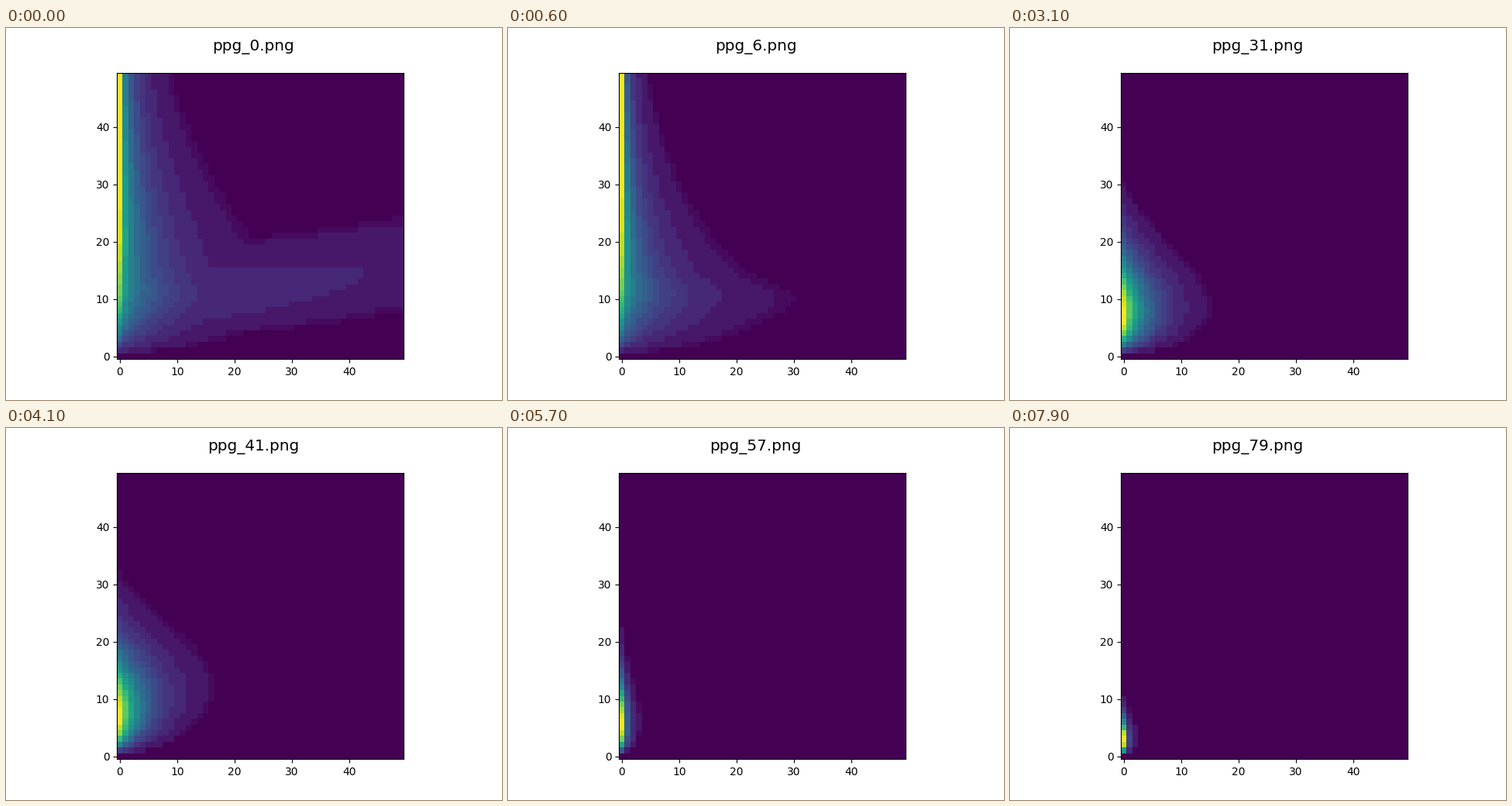
Recreate the animation shown at these times as a matplotlib script. Size 640 by 480 pixels, loop 8 s.

```python
import numpy as np
import matplotlib.pyplot as plt
from matplotlib.animation import FuncAnimation

plt.rcParams["text.kerning_factor"] = 6

N, FRAMES, STEP_MS = 50, 80, 100
Y, X = np.mgrid[0:N, 0:N].astype(float)


def bell(d, width):
    return np.exp(-(d / width) ** 2)


def decay(reach, power):
    return np.exp(-(X / reach) ** power)


def tall(rise, fall):
    """Column that saturates upward and reaches furthest near row 10."""
    reach = 5 / (1 + (Y / fall) ** 2) + bell(Y - 10, 3.5)
    return (1 - np.exp(-Y / rise)) * decay(reach, 0.6)


def plume():
    """Faint ridge that bends up towards the right edge."""
    d = Y - (8.5 + 0.06 * X + 0.0018 * X ** 2)
    width = np.where(d > 0, 8.9 + 0.02 * X, 5.5 + 0.0016 * X ** 2)
    return (0.14 - 0.0013 * X) * np.clip(X / 10, 0, 1) * bell(d, width)


def blob(peak, sharp, reach, mid):
    """Gamma-shaped column that reaches furthest at row mid."""
    r = np.maximum(Y, 1e-3) / peak
    column = np.exp(np.where(r > 1, sharp, 1.4) * (np.log(r) + 1 - r))
    return (Y > 0) * column * decay(reach * bell(Y - mid, 22), 0.9)


STATES = {
    0: np.maximum(tall(7.5, 28), plume()),
    6: tall(8, 19),
    15: blob(7, 1.3, 4.5, 10),
    31: blob(7.5, 1.93, 4.2, 12),
    41: blob(7.3, 1.73, 5.5, 20),
    57: blob(5.7, 2.04, 0.88, 8),
    79: blob(3, 2.47, 0.66, 4),
}
TIMES = list(STATES)
LOGS = [np.log(v + 1e-4) for v in STATES.values()]


def banded(v):
    """Coarse colour steps, finest near the dark end."""
    steps = np.minimum(0.15 + 0.04 * np.floor((v - 0.13) / 0.04), 1)
    return np.select([v < 0.037, v < 0.045, v < 0.085, v < 0.13],
                     [0, 0.03, 0.065, 0.11], steps)


def field(n):
    """Blend neighbouring states geometrically, then scale to a peak of 1."""
    k = min(np.searchsorted(TIMES, n, side="right") - 1, len(TIMES) - 2)
    f = (n - TIMES[k]) / (TIMES[k + 1] - TIMES[k])
    v = np.exp((1 - f) * LOGS[k] + f * LOGS[k + 1])
    return banded(v / v.max())


fig, ax = plt.subplots(figsize=(6.4, 4.8), dpi=100)
image = ax.imshow(field(0), origin="lower", cmap="viridis", vmin=0, vmax=1)
title = fig.text(319.5 / 640, 1 - 29 / 480, "", fontsize=14.4,
                 ha="center", va="baseline")


def draw(n):
    image.set_data(field(n))
    title.set_text(f"ppg_{n}.png")
    return image, title


anim = FuncAnimation(fig, draw, frames=FRAMES, interval=STEP_MS,
                     repeat=True, repeat_delay=0)
plt.show()
```
